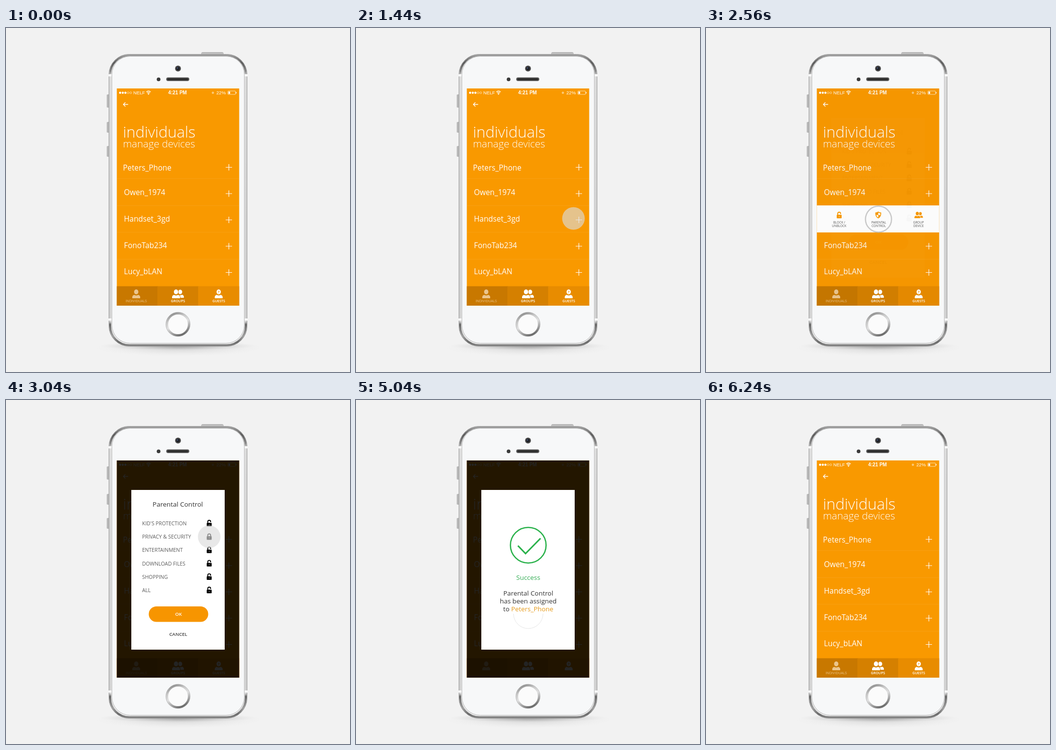
An HTML page that plays this animation: 700 by 700 pixels, repeating every 6.32 s.

```html
<!DOCTYPE html>
<html lang="en">
<head>
<meta charset="utf-8">
<title>Device manager</title>
<style>
  html, body { margin: 0; width: 100%; height: 100%; overflow: hidden; background: #f2f2f2; }
  svg { display: block; width: 100vw; height: 100vh; }
  text { font-family: "Open Sans", "Noto Sans", sans-serif; white-space: pre; }
  .status text { font-family: "Liberation Sans", Arial, sans-serif; }
</style>
</head>
<body>
<svg id="stage" viewBox="0 0 700 700" xmlns="http://www.w3.org/2000/svg"></svg>
<script>
const LOOP = 6320, STEP = 80;
const ORANGE = '#f99900', GREEN = '#2bb24c', FACE = '#f7f8f9';
const TAB_COLORS = ['#c87800', '#d58000', '#e88c00'];
const DEVICE = 'Peters_Phone';

const text = (x, y, str, size, fill = '#fff', weight = 400, anchor = 'start') =>
  `<text x="${x}" y="${y}" font-size="${size}" fill="${fill}" font-weight="${weight}" text-anchor="${anchor}">${str}</text>`;
const mid = (x, y, str, size, fill, weight) => text(x, y, str, size, fill, weight, 'middle');
const rect = (x, y, w, h, fill, rx = 0, extra = '') =>
  `<rect x="${x}" y="${y}" width="${w}" height="${h}" rx="${rx}" fill="${fill}" ${extra}/>`;
const circle = (x, y, r, fill, extra = '') =>
  `<circle cx="${x}" cy="${y}" r="${r}" fill="${fill}" ${extra}/>`;
const line = (d, stroke, width, extra = '') =>
  `<path d="${d}" fill="none" stroke="${stroke}" stroke-width="${width}" ${extra}/>`;
const at = (x, y, body, scale = 1, extra = '') =>
  `<g transform="translate(${x} ${y}) scale(${scale})" ${extra}>${body}</g>`;
const gradient = (id, coords, stops) =>
  `<linearGradient id="${id}" gradientUnits="userSpaceOnUse" ${coords}>` +
  stops.map(([o, c]) => `<stop offset="${o}" stop-color="${c}"/>`).join('') + '</linearGradient>';

// Icons, centred on the origin
const person = fill =>
  `<g fill="${fill}"><ellipse cx="0" cy="-4" rx="4.4" ry="5"/>` +
  `<path d="M-8 9V6.5Q-8 3-4 2Q0 4.5 4 2Q8 3 8 6.5V9Z"/></g>`;
const group = (fill, back) =>
  at(5, -.2, person(fill), .92) +
  at(-3.5, 0, `<g stroke="${back}" stroke-width="1.8" paint-order="stroke">${person(fill)}</g>`);
const lock = (open, fill) =>
  rect(-5, -1, 10, 7.2, fill, 1) + circle(0, 2.4, 1, '#fff', 'opacity=".55"') +
  line(open ? 'M-2.9-.5v-2.8a2.9 2.9 0 0 1 5.8 0v.9' : 'M-2.9-.5v-2.4a2.9 2.9 0 0 1 5.8 0V-.5', fill, 1.9);
const shield =
  `<path d="M-6-5Q-3-5 0-7Q3-5 6-5Q6.5 4 0 7Q-6.5 4-6-5Z" fill="${ORANGE}"/>` +
  '<path d="M0-5Q2-3.7 4.2-3.5V0H0ZM0 0H-4.1Q-3.2 3.7 0 5.2Z" fill="#fff"/>';
const plus = (x, y) => line(`M${x - 6.5} ${y}h13M${x} ${y - 6.5}v13`, '#fff', 1.2);

function defs() {
  return '<defs>' +
    gradient('rim', 'x1="0" y1="53" x2="0" y2="648"',
      [[0, '#a8a8a8'], [.012, '#8a8a8a'], [.03, '#5c5c5c'], [.06, '#8a8a8a'], [.075, '#dcdcdc'], [.5, '#d4d4d4'],
       [.915, '#d0d0d0'], [.925, '#666'], [.965, '#a0a0a0'], [.985, '#6a6a6a'], [1, '#8c8c8c']]) +
    gradient('key', 'x1="0" y1="49" x2="0" y2="55"', [[0, '#6f6f6f'], [.4, '#d2d2d2'], [1, '#858585']]) +
    gradient('side', 'x1="205" y1="0" x2="210" y2="0"', [[0, '#6f6f6f'], [.5, '#cfcfcf'], [1, '#858585']]) +
    gradient('ring', 'x1="340" y1="580" x2="360" y2="626"',
      [[0, '#8d8d8d'], [.25, '#c9c9c9'], [.5, '#e2e2e2'], [.75, '#a4a4a4'], [1, '#5e5e5e']]) +
    '<radialGradient id="shade"><stop offset="0" stop-color="#666" stop-opacity=".6"/>' +
    '<stop offset=".6" stop-color="#999" stop-opacity=".25"/><stop offset="1" stop-color="#ccc" stop-opacity="0"/></radialGradient>' +
    '<clipPath id="screen"><rect x="225.5" y="123" width="249" height="442"/></clipPath></defs>';
}

function phone() {
  const sideKeys = [[135, 27], [191, 22], [240, 22]].map(([y, h]) => rect(205.5, y, 5, h, 'url(#side)', 1.5)).join('');
  const bands = [94, 591].map(y => rect(209, y, 6, 4.5, '#fafafa') + rect(485.5, y, 6, 4.5, '#fafafa')).join('');
  return '<ellipse cx="353" cy="651" rx="172" ry="17" fill="url(#shade)" opacity=".35"/>' +
    '<ellipse cx="350" cy="647" rx="160" ry="9" fill="url(#shade)"/>' +
    '<path d="M397 55v-3q0-2.5 3-2.5h40q3 0 3 2.5v3z" fill="url(#key)"/>' + sideKeys +
    rect(209.5, 53.5, 281, 594, '#ededed', 41, 'stroke="#979797" stroke-width="1"') +
    rect(212, 55.5, 276, 590, 'none', 39, 'stroke="url(#rim)" stroke-width="4"') +
    bands +
    rect(215.5, 57.5, 269.5, 584, FACE, 37, 'stroke="#b4b4b4" stroke-width="1"') +
    circle(350, 82.5, 6, '#4a4a4a') + circle(350, 82.5, 3.6, '#1d1f24') + circle(349, 81.5, 1.2, '#50648a') +
    circle(310.5, 104.5, 3.8, '#3b3b3b') +
    rect(326, 100.5, 47, 7.5, '#5e5e5e', 3.7) + rect(328, 102.2, 43, 4, '#2c2c2c', 2) +
    circle(350, 603, 22.3, '#fbfbfb', 'stroke="url(#ring)" stroke-width="4.4"') +
    circle(350, 603, 24.7, 'none', 'stroke="#a5a5a5" stroke-width=".7"');
}

function statusBar() {
  const dots = [0, 1, 2, 3, 4].map(i =>
    circle(232.2 + i * 5.4, 131.8, i < 3 ? 2.2 : 1.9, i < 3 ? '#fff' : 'none', i < 3 ? '' : 'stroke="#fff" stroke-width=".6"')).join('');
  return `<g class="status">${dots}` + text(259, 135, 'NELF', 9.3) +
    line('M285.5 130.2q4.5-3.8 9 0M287.3 132.3q2.7-2.3 5.4 0', '#fff', 1.4) + circle(290, 134.2, 1.3, '#fff') +
    mid(349, 135, '4:21 PM', 10, '#fff', 700) +
    circle(421, 131.8, 2.4, '#fff', 'opacity=".45"') + text(428, 135, '22%', 9.6) +
    rect(451.5, 128.2, 15.5, 7, 'none', 1, 'stroke="#fff" stroke-width=".8" opacity=".85"') +
    rect(452.7, 129.4, 3.4, 4.6, '#fff') + rect(467.7, 130.2, 1.3, 3, '#fff') + '</g>';
}

function list() {
  const rows = [[238, 289.5, DEVICE], [240, 340, 'Owen_1974'], [240, 393.5, 'Handset_3gd'],
                [240, 448, 'FonoTab234'], [240, 500.5, 'Lucy_bLAN']];
  return rect(225, 122, 251, 444, ORANGE) + statusBar() +
    line('M248.5 155.5H239M243 151.3l-4.2 4.2l4.2 4.2', '#fff', 1.3) +
    text(238, 222.5, 'individuals', 31.2, '#fff', 300) +
    text(238, 243, 'manage devices', 20.5, '#fff', 300) +
    rows.map(([x, y, s], i) => text(x, y, s, 15.4) + plus(453.5, 283.5 + i * 53.5)).join('') +
    [306.5, 361.5, 415.5, 470.5].map(y => line(`M225 ${y}h250`, '#fff', 1, 'opacity=".07"')).join('') +
    TAB_COLORS.map((c, i) => rect(225 + i * 83, 525.5, 84, 40, c)).join('') +
    at(265, 541, person('#ecc58c')) + at(349.5, 541, group('#fff', TAB_COLORS[1])) +
    at(432.8, 541, person('#fff')) + mid(432.8, 540, '?', 7, TAB_COLORS[2], 700) +
    '<g id="tabNames">' + mid(265, 558, 'INDIVIDUALS', 7.2, '#ecc58c') +
    mid(350, 558, 'GROUPS', 7.1, '#fff', 600) + mid(433, 558, 'GUESTS', 7, '#fff', 600) + '</g>';
}

function drawer() {
  const label = (x, a, b) => mid(x, 398, a, 6.3, '#555') + mid(x, 404.6, b, 6.3, '#555');
  return rect(225, 361, 251, 55, '#fff') +
    at(271, 381, lock(true, ORANGE)) + label(271, 'BLOCK /', 'UNBLOCK') +
    at(350.5, 380.5, shield) + label(351.5, 'PARENTAL', 'CONTROL') +
    at(432.5, 380.5, group(ORANGE, '#fff'), .72) + label(432.5, 'GROUP', 'DEVICE');
}

const OPTIONS = ["KID'S PROTECTION", 'PRIVACY &amp; SECURITY', 'ENTERTAINMENT', 'DOWNLOAD FILES', 'SHOPPING', 'ALL'];
const optionY = i => 251 + i * 27.2;

function controls() {
  return mid(349.5, 217, 'Parental Control', 13.5, '#333') +
    OPTIONS.map((s, i) => text(277, optionY(i) + 4, s, 10.4, '#5c5c5c') +
      at(413.5, optionY(i), `<g id="open${i}">${lock(true, '#000')}</g><g id="shut${i}">${lock(false, '#000')}</g>`)).join('') +
    rect(290.5, 420, 121, 31.5, '#f79500', 15.7) + mid(351, 439.3, 'OK', 9.6, '#fff', 600) +
    mid(350.5, 480.3, 'CANCEL', 9.6, '#444', 600);
}

function success() {
  return circle(350.5, 295.5, 36.3, 'none', `stroke="${GREEN}" stroke-width="2.6"`) +
    line('M329.5 296.5L345 312.5L375.5 281.5', GREEN, 3.2) +
    mid(350.5, 366, 'Success', 13.5, '#37ae57') +
    mid(350.5, 398, 'Parental Control', 13.4, '#333') +
    mid(350.5, 413.7, 'has been assigned', 13.4, '#333') +
    mid(350.5, 429.5, `to <tspan fill="#e59a1a">${DEVICE}</tspan>`, 13.4, '#333');
}

const stage = document.getElementById('stage');
stage.innerHTML = defs() + phone() + '<g clip-path="url(#screen)">' + list() +
  `<g id="drawer">${drawer()}</g>` +
  `<g id="dim">${rect(225, 122, 251, 444, '#000', 0, 'opacity=".86"')}</g>` +
  `<g id="modal">${rect(255, 183, 190, 325, '#fff')}<g id="controls">${controls()}</g><g id="success">${success()}</g>` +
  line('M320.5 435a30 30 0 0 0 60 0', '#e6e6e6', 1, 'id="trace"') + '</g>' +
  '<circle id="tap" fill="#dcdcdc" stroke="#b8b8b8" stroke-width="2.5"/></g>';

const el = id => document.getElementById(id);
const fade = (id, v) => el(id).setAttribute('opacity', v);

// Linear value along [time, value] points
function track(t, points) {
  if (t <= points[0][0]) return points[0][1];
  for (let i = 1; i < points.length; i++) {
    const [t0, a] = points[i - 1], [t1, b] = points[i];
    if (t <= t1) return a + (b - a) * (t - t0) / (t1 - t0);
  }
  return points[points.length - 1][1];
}

const SLIDE = [[1440, 250], [1520, 139], [1600, 45], [1680, 8], [1760, 0]];
const DIM = [[2480, 0], [2560, .015], [2640, .35], [2720, .75], [2800, 1], [6080, 1], [6240, 0]];
const SWAP = [[4720, 0], [4960, 1]];
const TRACE = [[4880, 0], [4960, 1], [5040, 1], [5520, 0]];
// x, y, press, release
const TAPS = [[442.5, 387.5, 960, 1440], [351, 389, 2160, 2400], [413.5, optionY(1), 2880, 3040],
              [413.5, optionY(2), 3200, 3360], [413.5, optionY(3), 3520, 3680], [351, 435.5, 4320, 4640]];
const SPREAD = 320;

function drawTap(t) {
  const tap = TAPS.find(p => t >= p[2] && t < p[3] + SPREAD);
  const dot = el('tap');
  dot.style.display = tap ? '' : 'none';
  if (!tap) return;
  const [x, y, down, up] = tap;
  const grow = Math.min(1, (t - down + STEP) / 240);
  const k = Math.max(0, (t - up) / SPREAD);
  dot.setAttribute('cx', x);
  dot.setAttribute('cy', y);
  dot.setAttribute('r', 23 * (.5 + .5 * grow) + 7 * k);
  dot.setAttribute('fill-opacity', .64 * grow * Math.max(0, 1 - 2 * k));
  dot.setAttribute('stroke-opacity', k ? 1 - k * k : 0);
}

function render(t) {
  el('drawer').setAttribute('transform', `translate(${track(t, SLIDE)} 0)`);
  el('drawer').style.display = t > 1440 && t < 2800 ? '' : 'none';
  const dim = track(t, DIM), swap = track(t, SWAP);
  fade('dim', dim);
  fade('modal', dim);
  fade('controls', 1 - swap);
  fade('success', swap);
  fade('trace', track(t, TRACE));
  fade('tabNames', t > 4800 && t < 6160 ? 0 : 1);
  OPTIONS.forEach((_, i) => {
    const shut = i > 0 && i < 4 && t >= TAPS[i + 1][3];
    fade('open' + i, shut ? 0 : 1);
    fade('shut' + i, shut ? 1 : 0);
  });
  drawTap(t);
}

const start = performance.now();
function tick() {
  const t = (performance.now() - start) % LOOP;
  render(Math.floor(t / STEP) * STEP);
  requestAnimationFrame(tick);
}
tick();
</script>
</body>
</html>
```
